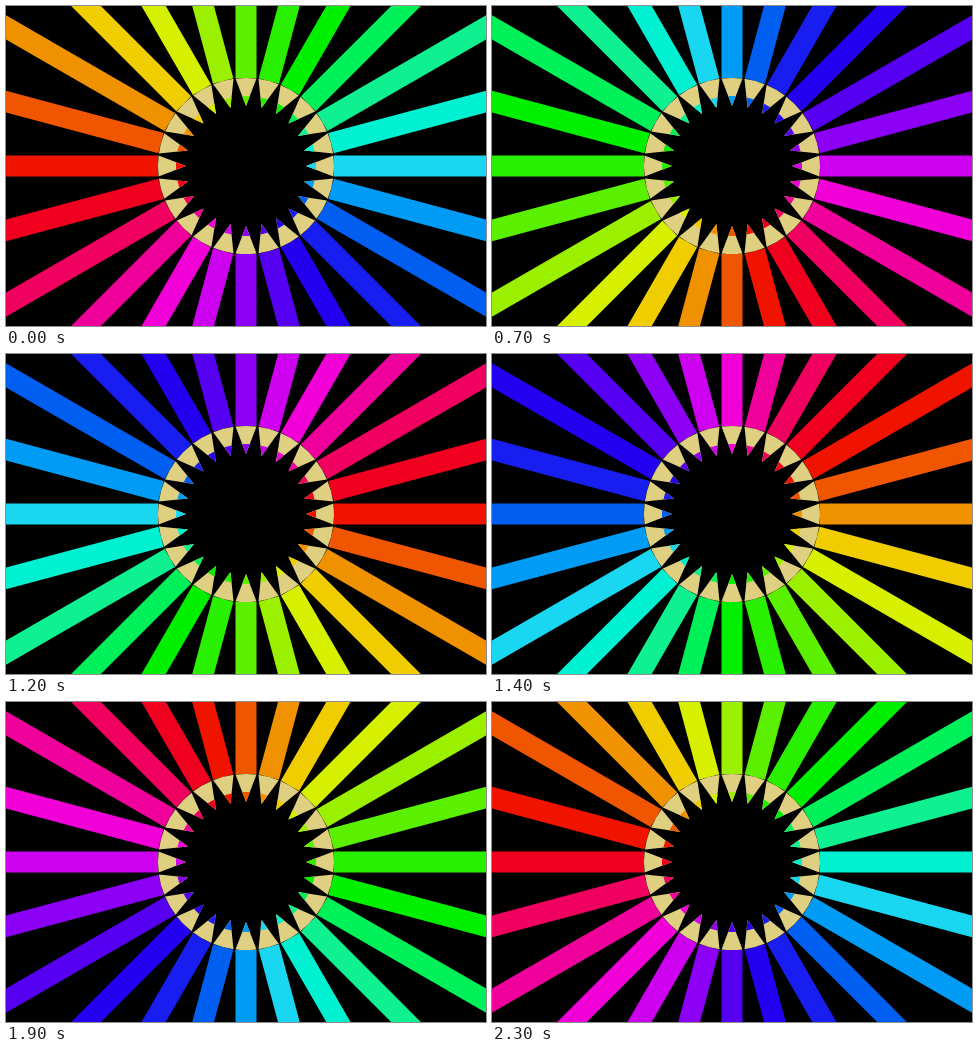
Animation, 480 px wide and 320 px high, one loop 2400 ms. Source, as an HTML page:

```html
<!DOCTYPE html>
<html lang="en">
<head>
<meta charset="utf-8">
<title>Pencil color wheel</title>
<style>
  html, body { margin: 0; width: 100%; height: 100%; overflow: hidden; background: #000; }
  svg { display: block; width: 100vw; height: 100vh; }
</style>
</head>
<body>
<svg id="stage" viewBox="0 0 480 320"></svg>
<script>
const COLORS = [
  '#5af000', '#28f000', '#00f000', '#00f05a', '#0ff091', '#00f0d2',
  '#19d7f0', '#009bf5', '#005ff0', '#191ef0', '#2300f0', '#5500f0',
  '#8c00f5', '#cd00f0', '#f000d7', '#f0009b', '#f0005f', '#f0001e',
  '#f01400', '#f05500', '#f09100', '#f0cd00', '#d7f000', '#9bf000'
];
const WOOD = '#dfcf80';
const STEP_MS = 100;
const COUNT = COLORS.length;
const HALF_WIDTH = 10.5, SHOULDER = 88, LEAD = 70, TIP = 60;

const stage = document.getElementById('stage');

function add(parent, tag, attributes) {
  const node = document.createElementNS('http://www.w3.org/2000/svg', tag);
  for (const [key, value] of Object.entries(attributes)) node.setAttribute(key, value);
  return parent.appendChild(node);
}

// Each pencil points at the origin, with its body extending upward.
function makePencil(index) {
  const w = HALF_WIDTH;
  const leadWidth = w * (LEAD - TIP) / (SHOULDER - TIP);
  const pencil = add(wheel, 'g', { transform: `rotate(${index * 360 / COUNT})` });
  add(pencil, 'path', { d: `M${-w} -320H${w}V${-SHOULDER}H${-w}Z` });
  add(pencil, 'path', {
    fill: WOOD,
    d: `M${-w} ${-SHOULDER + 0.6}A${SHOULDER} ${SHOULDER} 0 0 1 ${w} ${-SHOULDER + 0.6}L0 ${-TIP}Z`
  });
  add(pencil, 'path', { d: `M${-leadWidth} ${-LEAD}H${leadWidth}L0 ${-TIP}Z` });
  return pencil;
}

const wheel = add(stage, 'g', { transform: 'translate(240 160)' });
const pencils = COLORS.map((_, index) => makePencil(index));

function render(time) {
  const step = Math.floor(time / STEP_MS) % COUNT;
  pencils.forEach((pencil, index) => pencil.setAttribute('fill', COLORS[(index + step) % COUNT]));
}

function tick(now) {
  render(now);
  requestAnimationFrame(tick);
}

render(0);
requestAnimationFrame(tick);
</script>
</body>
</html>
```
